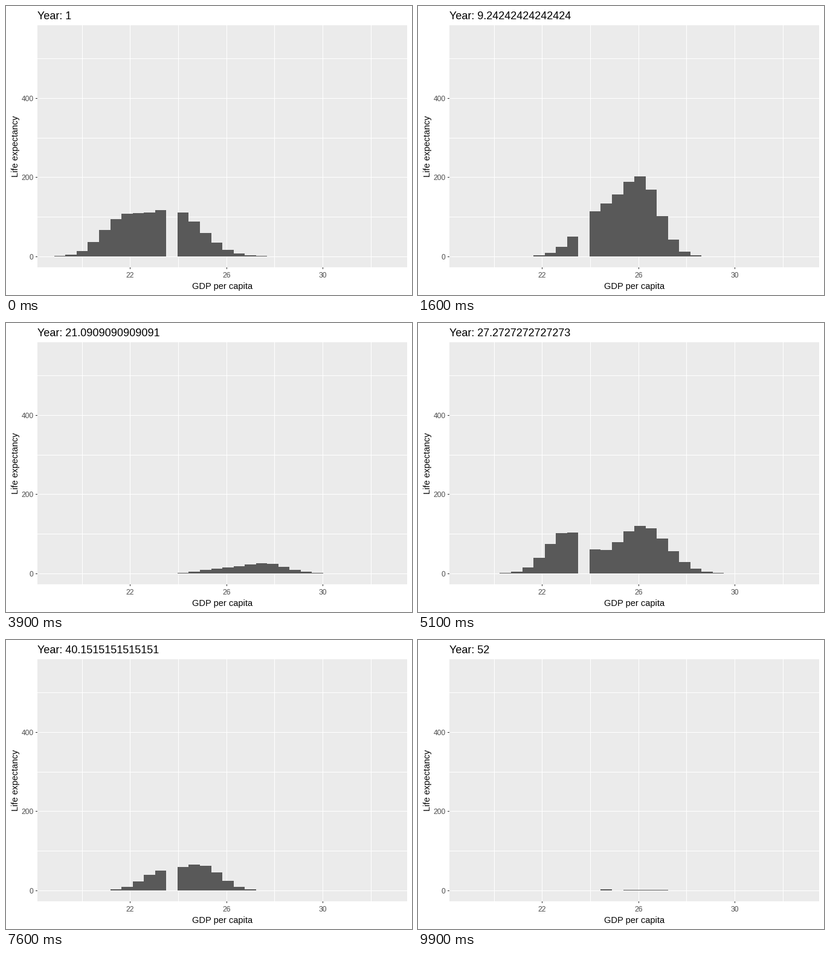
Recreate the animation shown at these times as a matplotlib script. Size 672 by 480 pixels, loop 10 s.

```python
import matplotlib.pyplot as plt
import numpy as np
from matplotlib.animation import FuncAnimation
from matplotlib.patches import Rectangle

W, H, DPI = 672, 480, 96
FRAMES, INTERVAL = 100, 100
BINS, GAP = 30, 10
BASE, UNIT = 416, 0.658
GREY = "#4D4D4D"

# Two humps that drift and swell: step, then (height, centre, width) of each
KEYS = np.array([
    (0, 82, 5.4, 1.8, 117, 10.1, 2.5),
    (16, 110, 11.5, 2.0, 180, 15.2, 1.65),
    (39, 10, 13.8, 1.5, 26, 18.2, 2.0),
    (51, 105, 8.5, 1.8, 121, 15.2, 2.25),
    (66, 58, 11.6, 1.7, 36, 14.6, 1.6),
    (87, 30, 6.0, 1.6, 90, 10.5, 1.8),
    (99, 2.5, 12.0, 0.4, 1.2, 15.5, 1.8),
])
BIN = np.arange(BINS)


def hump(height, centre, width):
    return height * np.exp(-((BIN - centre) / width) ** 2 / 2)


def counts_at(step):
    p = [np.interp(step, KEYS[:, 0], col) for col in KEYS[:, 1:].T]
    counts = hump(*p[:3]) + hump(*p[3:])
    counts[GAP] = 0
    return counts


def x_px(value):
    return int(126 + 39.85 * (value - 20))


def y_px(value):
    return round(BASE - UNIT * value)


plt.rcParams["font.family"] = "Liberation Sans"
fig = plt.figure(figsize=(W / DPI, H / DPI), dpi=DPI, facecolor="white")
ax = fig.add_axes([0, 0, 1, 1])
ax.set(xlim=(0, W), ylim=(H, 0))
ax.axis("off")


def rect(x, y, w, h, color):
    patch = Rectangle((x, y), w, h, facecolor=color, linewidth=0,
                      antialiased=False)
    return ax.add_patch(patch)


def label(x, y, text, px, color="black", **kw):
    return ax.text(x, y, text, fontsize=px * 72 / DPI, color=color,
                   va="baseline", **kw)


# Panel, grid and axes
rect(52, 32, 612, 402, "#EBEBEB")
for v in range(0, 501, 100):
    rect(52, y_px(v), 612, 1, "white")
for v in range(20, 33, 2):
    rect(x_px(v), 32, 1, 402, "white")

for v in (22, 26, 30):
    rect(x_px(v), 434, 1, 3, "#333333")
    label(x_px(v) + 0.5, 451, str(v), 12, GREY, ha="center")
for v in (0, 200, 400):
    rect(49, y_px(v), 3, 1, "#333333")
    label(45.5, y_px(v) + 5, str(v), 12, GREY, ha="right")

label(358, 470, "GDP per capita", 14.67, ha="center")
label(20, 232.5, "Life expectancy", 14.67, ha="center", rotation=90,
      rotation_mode="anchor")
title = label(52, 22, "", 18)

edges = np.round(79.8 + 18.55 * np.arange(BINS + 1))
bars = [rect(x, BASE, w, 0, "#595959")
        for x, w in zip(edges, np.diff(edges))]


def update(step):
    year = 1 + 51 * step / (FRAMES - 1)
    title.set_text(f"Year: {year:.15g}")
    for bar, n in zip(bars, counts_at(step)):
        h = round(n * UNIT)
        bar.set_height(-h)
        bar.set_visible(h > 0)
    return [title, *bars]


anim = FuncAnimation(fig, update, frames=FRAMES, interval=INTERVAL,
                     repeat=True, repeat_delay=0)
plt.show()
```
